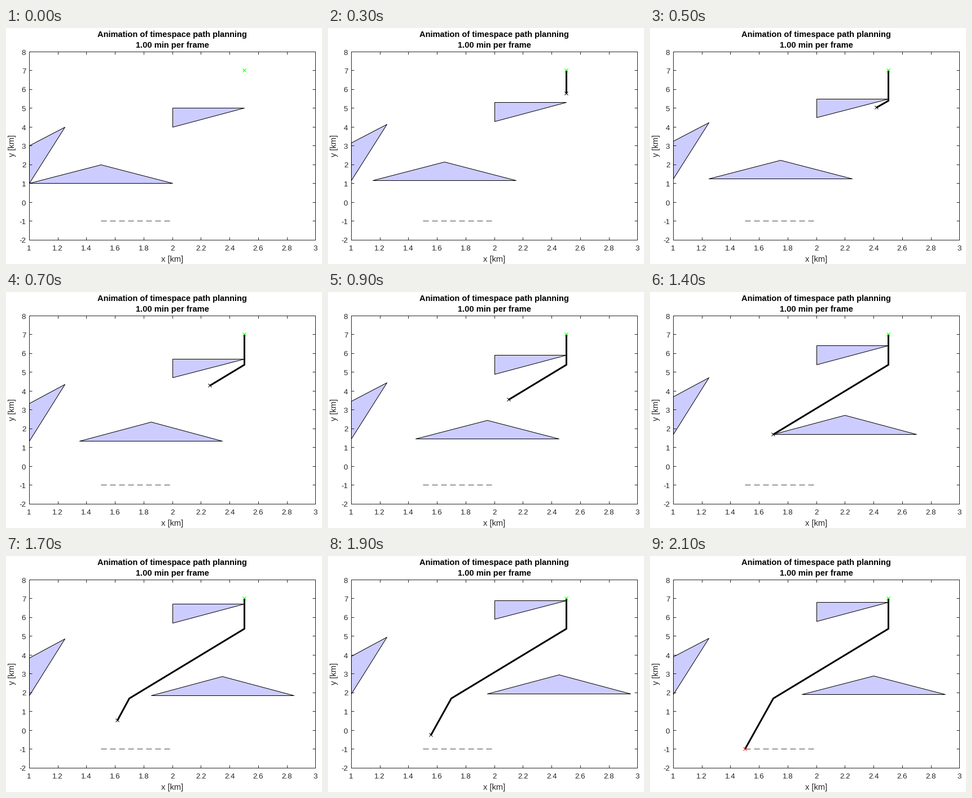
A matplotlib script that plays this animation: 560x420 px, repeating every 2200 ms.

```python
import numpy as np
import matplotlib.pyplot as plt
from matplotlib.animation import FuncAnimation
from matplotlib.patches import Polygon

W, H, DPI = 560, 420, 100
PX = 72 / DPI  # one pixel in points
LEFT, RIGHT, TOP, BOTTOM = 40.8, 548.45, 41.9, 376.9
FRAMES, STEP_MS = 22, 100
GREY = "#262626"

plt.rcParams["font.family"] = "Liberation Sans"

fig = plt.figure(figsize=(W / DPI, H / DPI), dpi=DPI, facecolor="white")
ax = fig.add_axes([LEFT / W, 1 - BOTTOM / H,
                   (RIGHT - LEFT) / W, (BOTTOM - TOP) / H])
ax.set(xlim=(1, 3), ylim=(-2, 8))
x_ticks = np.linspace(1, 3, 11)
y_ticks = np.arange(-2, 9)
ax.set_xticks(x_ticks)
ax.set_yticks(y_ticks)
ax.tick_params(direction="in", length=5 * PX, width=PX, color=GREY,
               top=True, right=True, labelbottom=False, labelleft=False)
for spine in ax.spines.values():
    spine.set(linewidth=PX, color=GREY)


def put(x, y, text, size=14.67, ha="center", color=GREY, **kw):
    """Place text by its baseline, in pixels from the top left."""
    fig.text(x / W, 1 - y / H, text, fontsize=size * PX, ha=ha,
             va="baseline", color=color, **kw)


def marker(color, zorder):
    return ax.plot([], [], "x", color=color, ms=6 * PX, mew=PX,
                   zorder=zorder, clip_on=False)[0]


mid = (LEFT + RIGHT) / 2
put(mid, 16, "Animation of timespace path planning", color="black", weight="bold")
put(mid, 35, "1.00 min per frame", color="black", weight="bold")
put(mid, 416, "x [km]")
put(15, (TOP + BOTTOM) / 2, "y [km]", rotation=90, rotation_mode="anchor")
for v in x_ticks:
    put(LEFT + (v - 1) / 2 * (RIGHT - LEFT), 396, f"{v:g}", 13.33)
for v in y_ticks:
    put(35.3, TOP + (8 - v) / 10 * (BOTTOM - TOP) + 5.6, f"{v:g}", 13.33, "right")

# Each obstacle: corners and velocity per step
obstacles = [
    (np.array([(1, 1), (1, 3), (1.25, 4)]), np.array([0, 0.05])),
    (np.array([(1, 1), (1.5, 2), (2, 1)]), np.array([0.05, 0.05])),
    (np.array([(2, 4), (2, 5), (2.5, 5)]), np.array([0, 0.1])),
]
shapes = [ax.add_patch(Polygon(pts, facecolor=(0, 0, 1, 0.2), edgecolor="black",
                               linewidth=PX, joinstyle="round", snap=True,
                               zorder=3, clip_on=False))
          for pts, _ in obstacles]

ax.plot([1.5, 2], [-1, -1], color="#404040", lw=PX, dashes=(10, 6),
        dash_capstyle="butt", zorder=3)

# Waypoints and the step at which each is reached
way = np.array([(2.5, 7), (2.5, 5.4), (1.7, 1.7), (1.5, -1)])
reach = np.array([0, 4, 14, 21])

path, = ax.plot([], [], color="black", lw=3 * PX, zorder=4,
                solid_capstyle="butt", solid_joinstyle="round", snap=True)
head = marker("black", 5)
start = marker("#00ff00", 6)
start.set_data([2.5], [7])


def update(k):
    last = k == FRAMES - 1
    t = 18 if last else k  # obstacles jump back on arrival
    for shape, (pts, vel) in zip(shapes, obstacles):
        shape.set_xy(pts + vel * t)
    pos = [np.interp(k, reach, way[:, i]) for i in (0, 1)]
    trail = np.vstack([way[reach < k], pos])
    path.set_data(trail[:, 0], trail[:, 1])
    head.set_data([pos[0]], [pos[1]])
    head.set_color("red" if last else "black")
    head.set_visible(k > 0)
    return [*shapes, path, head]


anim = FuncAnimation(fig, update, frames=FRAMES, interval=STEP_MS,
                     repeat=True, repeat_delay=0, blit=False)
plt.show()
```
